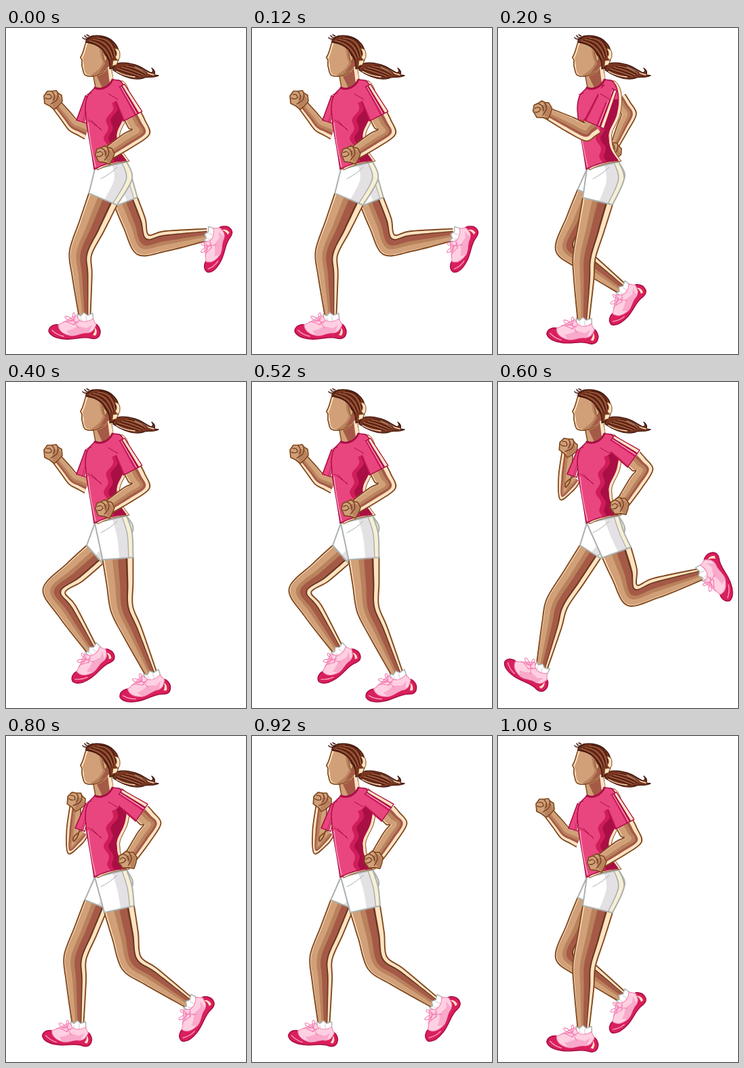
An HTML page with a canvas for the animation above (1.2 s loop, 354 by 480 pixels).

```html
<!DOCTYPE html>
<html lang="en">
<head>
<meta charset="utf-8">
<title>Running woman</title>
<style>
html, body { margin: 0; width: 100%; height: 100%; overflow: hidden; background: #fff; }
canvas { display: block; width: 354px; height: 480px; }
</style>
</head>
<body>
<canvas id="stage"></canvas>
<script>
const W = 354, H = 480, STEP = 200;
const canvas = document.getElementById('stage');
const ctx = canvas.getContext('2d');
const dpr = window.devicePixelRatio || 1;
canvas.width = W * dpr;
canvas.height = H * dpr;

const C = {
  line: '#80491f', cream: '#ffe3c2', tan: '#d1a078', mid: '#b9825d', red: '#a55a47', dark: '#6b381c',
  pink: '#e9467f', rose: '#cf1d5a', wine: '#a90f44', glow: '#fba3c3',
  white: '#fff', grey: '#aab0ae', shade: '#e4e1e5', ivory: '#f8efd4',
  hair: '#78351f', hairDark: '#42190f', hairLight: '#b06c4b',
  shoe: '#ffd0e2', shoeMid: '#f9aacb', lace: '#f37bb0', sole: '#d91f5c'
};
// Shading: where each colour starts, from one edge (0) to the other (1).
const LEG = [[0, 'cream'], [.06, 'tan'], [.32, 'mid'], [.5, 'red'], [.76, 'dark'], [.82, 'cream']];
const ARM = [[0, 'cream'], [.08, 'tan'], [.42, 'mid'], [.62, 'red'], [.77, 'cream']];
const SLEEVE = [[0, 'rose'], [.08, 'pink'], [.6, 'rose'], [.7, 'glow'], [.75, 'wine'], [.84, 'cream']];
const CLOTH = [[0, 'white'], [.55, 'shade'], [.84, 'grey'], [.87, 'ivory']];

const lerp = (a, b, t) => a + (b - a) * t;
const mix = (p, q, t) => [lerp(p[0], q[0], t), lerp(p[1], q[1], t)];

function draw(d, fill, stroke, width = 1.4) {
  const path = new Path2D(d);
  if (fill) { ctx.fillStyle = C[fill]; ctx.fill(path); }
  if (stroke) { ctx.strokeStyle = C[stroke]; ctx.lineWidth = width; ctx.stroke(path); }
}

function place(x, y, turn, size, paint) {
  ctx.save();
  ctx.translate(x, y);
  ctx.rotate(turn);
  ctx.scale(size, size);
  paint();
  ctx.restore();
}

// Smooth curve through points.
function curve(pts, start = 'M') {
  const at = i => pts[Math.max(0, Math.min(pts.length - 1, i))];
  let d = start + pts[0];
  for (let i = 0; i < pts.length - 1; i++) {
    const c = [0, 1].map(k => at(i)[k] + (at(i + 1)[k] - at(i - 1)[k]) / 6);
    const e = [0, 1].map(k => at(i + 1)[k] - (at(i + 2)[k] - at(i)[k]) / 6);
    d += `C${c} ${e} ${at(i + 1)}`;
  }
  return d;
}

// Fill the space between two edges with bands of colour.
function shaded(a, b, bands, stroke, width) {
  const back = curve([...b].reverse(), 'L') + 'Z';
  for (const [t, color] of bands) draw(curve(a.map((p, i) => mix(p, b[i], t))) + back, color);
  if (stroke === 'line') draw(curve(a) + curve(b), null, stroke, width);
  else draw(curve(a) + back, null, stroke, width);
}

const normal = (p, q) => {
  const d = Math.hypot(q[0] - p[0], q[1] - p[1]);
  return [(q[1] - p[1]) / d, (p[0] - q[0]) / d];
};

// Edges of a two-part limb with a width at each joint and a slight bulge below the bend.
function edges([top, bend, end], [w0, w1, w2], bulge) {
  const n0 = normal(top, bend), n2 = normal(bend, end);
  const m = mix(n0, n2, .5), len = Math.hypot(...m);
  const n1 = m.map(v => v / len);
  const rows = [
    [top, n0, w0],
    [mix(top, bend, .5), n0, (w0 + w1) / 2],
    [bend, n1, w1],
    [mix(bend, end, .35), n2, lerp(w1, w2, .35) + bulge],
    [end, n2, w2]
  ];
  return [-.5, .5].map(s => rows.map(([p, n, w]) => [p[0] + n[0] * w * s, p[1] + n[1] * w * s]));
}

function shoe(ankle, degrees, size) {
  place(...ankle, degrees * Math.PI / 180, size, () => {
    ctx.translate(-115, -423);
    draw('M104 421L109 424L114 419L119 423L127 420L128 433L118 438L106 433Z', 'white', 'grey');
    draw('M109 427L111 432M117 425L118 432', null, 'shade', 2);
    draw('M62 446C63 438 71 436 78 437L128 438C131 433 136 438 138 446C138 454 134 459 125 457C113 453 102 459 86 458C74 457 64 453 62 446Z', 'sole', 'wine', 1.6);
    draw('M76 437C84 434 94 427 102 423L108 431C116 434 123 431 127 428L132 437C128 445 127 448 119 449C109 448 103 454 94 453C84 451 76 446 76 437Z', 'shoe', 'lace', 1);
    draw('M88 446Q98 444 105 439L118 442L126 437L121 449C112 447 104 454 94 453Z', 'shoeMid');
    draw('M67 445Q74 452 84 454', null, 'glow', 1.4);
    draw('M130 441Q135 446 131 453L127 452Q131 447 130 441Z', 'cream');
    draw('M89 433L100 437M94 430L105 434M98 437L108 430M99 431C88 421 82 424 89 429Q94 432 99 431C103 421 99 416 97 422L99 431L83 433M99 431L106 442', null, 'lace', 1.1);
  });
}

function leg([hip, knee, ankle, turn], near) {
  const w = near ? 45 : 36;
  const [a, b] = edges([hip, knee, ankle], [w, 33, 17], 2);
  shaded(a, b, LEG, 'line', 1.9);
  shoe(ankle, turn, near ? 1 : .96);
  // The trouser leg hangs from the waist to the top of the limb.
  const waist = [131, 208];
  shaded([waist, mix(waist, a[0], .5), a[0]], [[178, 197], [186, 222], b[0]], CLOTH, 'grey', 2);
  if (near) draw('M140 222Q154 215 164 205', null, 'grey', 1);
}

function fist([x, y], degrees) {
  place(x, y, degrees * Math.PI / 180, 1, () => {
    draw('M-13 -6L-8 -13L-1 -13L5 -14L8 -10L13 -7L14 2L8 9L2 14L-4 9L-12 5Z', 'tan', 'line', 1.7);
    draw('M0 -7L9 -7L13 1L7 8L1 13L-1 5Z', 'mid');
    draw('M-9 -8Q-2 -10 -2 -3Q-7 0 -11 -3M-1 -12Q5 -7 1 0M7 -10Q9 -4 5 1L-3 6', null, 'dark', 1.2);
  });
}

function arm({ joints, width, turn }) {
  shaded(...edges(joints, width, 0), ARM, 'line', 1.8);
  fist(joints[2], turn);
}

function sleeve(from, to, w0, w1) {
  const n = normal(from, to), half = mix(from, to, .5);
  const side = s => [[from, w0], [half, (w0 + w1) / 2], [to, w1]].map(([p, w]) => [p[0] + n[0] * w * s, p[1] + n[1] * w * s]);
  shaded(side(-.5), side(.5), SLEEVE, 'wine', 1.3);
}

const BODY = 'M131 88C141 91 152 86 157 76L167 77C178 84 180 105 175 126C172 140 160 150 163 163C163 178 170 186 177 195Q150 197 130 208C127 185 123 164 119 142L117 120Q117 105 122 97Z';

function shirt() {
  draw(BODY, 'pink');
  ctx.save();
  ctx.clip(new Path2D(BODY));
  // Folds of shadow ripple down the back.
  for (const [depth, color] of [[13, 'rose'], [6, 'wine']]) {
    let d = 'M185 105';
    for (let y = 105; y <= 200; y += 2) {
      const back = 168 - 8 * Math.sin((y - 120) / 25);
      d += `L${back - depth + 3 * Math.sin(y / 4.5)} ${y}`;
    }
    draw(d + 'L190 200Z', color);
  }
  ctx.restore();
  draw(BODY, null, 'wine', 1.5);
  draw('M121 140Q124 172 132 204', null, 'glow', 1.4);
  draw('M121 135L140 149M126 136L141 151M119 98L126 96', null, 'wine', 1);
  draw('M131 88C141 92 152 87 157 76', null, 'wine', 3);
}

function head() {
  draw('M128 66L132 88C141 91 153 86 158 76L154 52Z', 'tan', 'line');
  draw('M134 71C144 69 149 62 153 52L158 76C152 86 146 88 142 88Z', 'red');
  draw('M150 58L154 55L158 75L153 81Z', 'cream');
  draw('M118 21C115 28 115 35 110 43C110 46 113 46 112 49L112 56C114 61 113 68 118 70C125 73 135 70 142 66L152 54L150 27L132 20Z', 'cream', 'line', 1.7);
  draw('M121 22C117 30 117 37 113 44L115 56Q115 66 120 69C129 71 137 68 143 64L151 54L150 27Z', 'tan');
  draw('M136 23C140 36 138 42 143 50C140 60 132 65 124 70C135 71 143 66 151 55L151 28Z', 'mid');
  draw('M140 27C142 41 146 43 146 53L136 68L152 56L152 30Z', 'red');
  draw('M143 38C145 34 150 36 149 44Q148 51 145 48Z', 'tan', 'line', 1);
  draw('M157 56C166 49 180 51 190 54C200 57 207 63 214 66Q219 64 215 59Q222 64 218 69L225 70C216 75 208 70 202 74C190 77 174 73 158 62Z', 'hair', 'hairDark', 1.4);
  draw('M190 57Q202 62 211 67L218 69M163 64Q176 71 190 72', null, 'cream', 1.4);
  draw('M118 21C117 15 122 16 126 12C137 10 150 12 158 20C166 27 169 39 165 49L158 59L153 60C154 50 150 43 146 39C145 30 132 23 118 21Z', 'hair', 'hairDark', 1.4);
  // strands, dark and light by turns
  for (let i = 0; i < 7; i++) {
    const ink = i % 2 ? 'hairLight' : 'hairDark';
    draw(`M${120 + 3 * i} ${20 - i}Q${142 + 3 * i} ${25 - 2 * i} ${152 + 1.7 * i} ${46 - i}`, null, ink, 1.2);
    draw(`M${162 + 3 * i} ${61 - i}Q${180 + 2 * i} ${67 - 2 * i} ${196 + 2 * i} ${72 - i}`, null, ink, 1.1);
  }
  draw('M126 13Q118 16 116 11M123 15Q115 18 113 14M123 12L119 10', null, 'hairDark', 1.4);
  draw('M160 30Q168 30 168 38Q169 44 165 48L161 43Q166 38 160 30ZM158 48L166 47L163 54L157 56Z', 'cream', 'line', 1);
}

// Arms: shoulder, elbow and hand; the near shoulder is also where the sleeve ends.
const arms = {
  swing: {
    near: { joints: [[187, 130], [199, 153], [146, 188]], width: [27, 26, 18], turn: -20 },
    far: { joints: [[120, 152], [99, 143], [69, 106]], width: [24, 19, 14], turn: 0 },
    cuff: [111, 138]
  },
  cross: {
    near: { joints: [[142, 142], [128, 153], [66, 122]], width: [30, 27, 15], turn: -25 },
    far: { joints: [[179, 103], [193, 127], [168, 182]], width: [20, 22, 10], turn: 10 }
  },
  reach: {
    near: { joints: [[200, 113], [216, 130], [180, 184]], width: [27, 25, 18], turn: -30 },
    far: { joints: [[116, 143], [96, 164], [103, 97]], width: [12, 20, 15], turn: 10 },
    cuff: [109, 138]
  }
};

// Each leg: hip, knee, ankle, shoe angle; the far one first.
const gaits = {
  stride: [[[177, 256], [202, 319], [297, 304], -67], [[143, 252], [110, 331], [116, 423], 0]],
  pass: [[[134, 245], [101, 323], [182, 383], -51], [[147, 255], [127, 338], [126, 430], 3]],
  drive: [[[131, 254], [71, 307], [126, 393], -37], [[165, 260], [171, 334], [214, 429], -14]],
  leap: [[[136, 250], [87, 326], [65, 419], 31], [[175, 251], [198, 314], [299, 283], -114]],
  land: [[[133, 248], [102, 326], [106, 423], 4], [[167, 255], [185, 334], [269, 392], -57]]
};

const poses = [
  ['swing', 'stride'], ['cross', 'pass'], ['swing', 'drive'],
  ['reach', 'leap'], ['reach', 'land'], ['swing', 'pass']
];

function render([reach, gait]) {
  ctx.setTransform(dpr, 0, 0, dpr, 0, 0);
  ctx.fillStyle = '#fff';
  ctx.fillRect(0, 0, W, H);
  ctx.lineJoin = ctx.lineCap = 'round';
  const { near, far, cuff } = arms[reach];
  const shoulder = [165, 88], end = near.joints[0];
  gaits[gait].forEach((l, i) => leg(l, i === 1));
  arm(far);
  place(5, 1, 0, 1, () => draw(BODY, 'cream', 'line', 1));
  head();
  if (cuff) sleeve([122, 101], cuff, 10, 15);
  shirt();
  arm(near);
  sleeve(shoulder, end, 22, 31);
  // Blend the top of the sleeve into the shirt.
  draw('M147 92Q154 88 160 82L168 88L166 105Q158 112 150 110Z', 'pink');
  draw('M151 97L165 105', null, 'wine', 1);
}

let shown = -1;
function tick() {
  const i = Math.floor(performance.now() / STEP) % poses.length;
  if (i !== shown) render(poses[shown = i]);
  requestAnimationFrame(tick);
}
tick();
</script>
</body>
</html>
```
